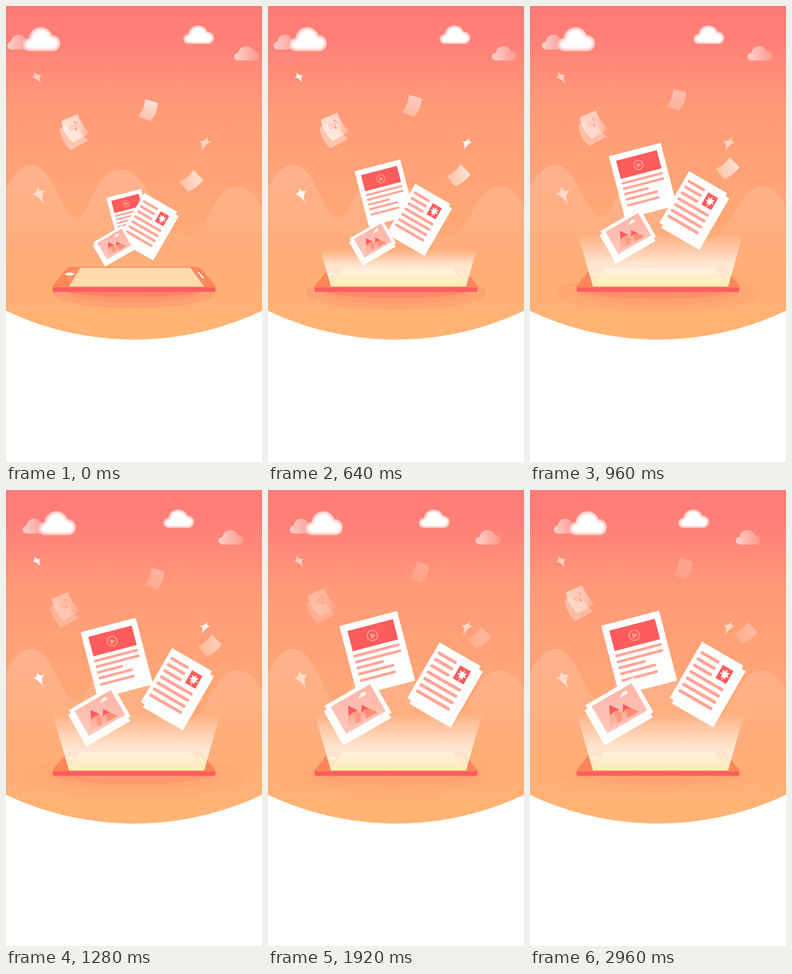
Animation of 561x998 px, one loop 3000 ms. Source, as an HTML page:

```html
<!DOCTYPE html>
<html lang="en">
<head>
<meta charset="utf-8">
<title>Documents rising</title>
<style>
html, body { margin: 0; width: 100%; height: 100%; overflow: hidden; background: #fff; }
svg { display: block; width: 100%; height: 100%; }
</style>
</head>
<body>
<svg viewBox="0 0 561 998" xmlns="http://www.w3.org/2000/svg">
  <defs>
    <linearGradient id="sky" x2="0" y2="1">
      <stop stop-color="#ff7a78"/><stop offset=".1" stop-color="#ff8078"/>
      <stop offset=".3" stop-color="#ff9a78"/><stop offset=".5" stop-color="#ffa377"/>
      <stop offset="1" stop-color="#ffb574"/>
    </linearGradient>
    <linearGradient id="hill" x2="0" y2="1">
      <stop stop-color="#fff" stop-opacity=".17"/><stop offset="1" stop-color="#fff" stop-opacity="0"/>
    </linearGradient>
    <linearGradient id="mist">
      <stop stop-color="#fff" stop-opacity=".62"/><stop offset="1" stop-color="#fff" stop-opacity=".15"/>
    </linearGradient>
    <linearGradient id="sheet" x1=".7" y1="0" x2=".4" y2="1">
      <stop stop-color="#fff" stop-opacity=".72"/><stop offset="1" stop-color="#fff" stop-opacity=".36"/>
    </linearGradient>
    <linearGradient id="sheetSide" x1="0" y1=".7" x2="1" y2=".4">
      <stop stop-color="#fff" stop-opacity=".35"/><stop offset="1" stop-color="#fff" stop-opacity=".75"/>
    </linearGradient>
    <linearGradient id="sheetNote" x1="0" y1=".5" x2="1" y2=".6">
      <stop stop-color="#fff" stop-opacity=".72"/><stop offset=".6" stop-color="#fff" stop-opacity=".6"/>
      <stop offset="1" stop-color="#fff" stop-opacity=".18"/>
    </linearGradient>
    <linearGradient id="photo" x1="1" y1="0" x2="0" y2="1">
      <stop stop-color="#ffb5a5"/><stop offset="1" stop-color="#ffc8bd"/>
    </linearGradient>
    <linearGradient id="slope" x2="0" y2="1">
      <stop stop-color="#ff9880"/><stop offset="1" stop-color="#ffb9aa"/>
    </linearGradient>
    <linearGradient id="glow" gradientUnits="userSpaceOnUse" x1="0" x2="0" y1="488" y2="614">
      <stop stop-color="#fff" stop-opacity="0"/>
      <stop id="glowMid" stop-color="#fff6ec" stop-opacity=".82"/>
      <stop offset="1" stop-color="#fdecb4"/>
    </linearGradient>
    <filter id="soft" x="-20%" y="-20%" width="140%" height="140%"><feGaussianBlur stdDeviation="3"/></filter>
    <path id="puff" d="M14 52A14 14 0 0 1 13 24A26 26 0 0 1 63.5 17.5A17.5 17.5 0 0 1 68 52Z"/>
    <clipPath id="puffClip"><use href="#puff"/></clipPath>
    <g id="cloud">
      <use href="#puff" fill="#fff"/>
      <g clip-path="url(#puffClip)">
        <use href="#puff" fill="none" stroke="#ffa29c" stroke-width="6" filter="url(#soft)"/>
      </g>
    </g>
    <clipPath id="ground"><path d="M0 0H561V667A656 656 0 0 1 0 667Z"/></clipPath>
  </defs>

  <path d="M0 0H561V667A656 656 0 0 1 0 667Z" fill="url(#sky)"/>
  <path fill="url(#hill)" d="M0 398C18 366 36 348 55 348C104 348 122 463 155 463C187 463 190 358 251 358C314 358 345 508 393 508C440 508 452 395 508 395C530 395 548 415 561 437V590H0Z"/>

  <g id="mistLeft"><use href="#puff" fill="url(#mist)" transform="translate(3 63) scale(.64 .62)"/></g>
  <g id="cloudLeft"><use href="#cloud" transform="translate(37.5 46.5)"/></g>
  <g id="cloudRight"><use href="#cloud" transform="translate(389 42.5) scale(.82 .78)"/></g>
  <g id="mistRight"><use href="#puff" fill="url(#mist)" transform="translate(500.5 88) scale(.66 .6)"/></g>

  <g id="stars"></g>

  <g id="notePaper">
    <path d="M118 268L152 254Q158 274 180 294L142 315Q120 296 118 268Z" fill="#fff" fill-opacity=".42"/>
    <path d="M121 252L157 237Q163 257 183 278L147 299Q124 278 121 252Z" fill="url(#sheetNote)"/>
    <g stroke="#ff9c84" stroke-width="1.5" fill="none" opacity=".8">
      <path d="M136 265l11-5M138 268.500l11-5M141 272l10-5"/>
      <path d="M148 254q6-2 8 5M149 254l5 15" stroke-width="2"/>
      <circle cx="153.500" cy="270" r="2.200" fill="#ff9c84"/>
    </g>
  </g>
  <path id="tallPaper" fill="url(#sheet)" d="M305 204L333 212Q331 237 316 252L290 242Q303 226 305 204Z"/>
  <path id="widePaper" fill="url(#sheetSide)" d="M411 359L432 381Q415 402 398 406L380 384Q398 378 411 359Z"/>

  <g id="ripples" fill="#ff5a5e" clip-path="url(#ground)"><ellipse/><ellipse/><ellipse/></g>

  <path d="M102 617V613L131 577Q136 571 143 571H416Q424 571 428 575L459 612V617Z" fill="#ff8659"/>
  <path d="M163 573L133 584L138 614ZM404 573L440 608L434 614Z" fill="#ff9a68" opacity=".45"/>
  <path d="M102 616H459V622Q459 625.500 455 625.500H106Q102 625.500 102 622Z" fill="#ff5c5f"/>
  <path d="M163 573H404L434 614H138Z" fill="#ffdbad"/>
  <ellipse cx="139.500" cy="586.800" rx="10.300" ry="3.200" fill="#fff"/>
  <path d="M426.500 588.500L431.500 594.500M422.500 584.300l1 .2" stroke="#fff" stroke-width="3.600" stroke-linecap="round"/>

  <path id="beam" fill="url(#glow)"/>

  <g id="videoDoc">
    <rect width="131" height="158" fill="#fff" stroke="#f08060" stroke-opacity=".14" stroke-width=".7"/>
    <rect x="14.500" y="15" width="103" height="46" fill="#ff5c5c"/>
    <circle cx="65" cy="38.500" r="11.300" fill="none" stroke="#ff9d8a" stroke-width="2.500"/>
    <path d="M62 34.500L70 39L62 43.500Z" fill="#ff9d8a" stroke="#ff9d8a" stroke-width="3" stroke-linejoin="round"/>
    <path d="M16 72.500H115M16 86H115M16 99.500H72M16 113H92M16 128H92" stroke="#ffa696" stroke-width="6" stroke-linecap="round"/>
  </g>

  <g id="textDoc">
    <rect x="10" y="8" width="105" height="142" fill="#fff"/>
    <rect width="105" height="142" fill="#fff" stroke="#f08060" stroke-opacity=".16" stroke-width=".8"/>
    <path d="M12 21H52M12 37H52M12 53H52M12 69H90M12 85H90M12 101H90M12 117H90" stroke="#ffa696" stroke-width="7.200" stroke-linecap="round"/>
    <rect x="65" y="21" width="27" height="33" fill="#ff5c5c"/>
    <path id="leaf" fill="#fff" stroke="#fff" stroke-width="1.500" stroke-linejoin="round"/>
    <path d="M79 38V53" stroke="#fff" stroke-width="1.600"/>
  </g>

  <g id="photoDoc">
    <rect x="-7" y="9" width="122" height="88" fill="#fff"/>
    <rect width="122" height="88" fill="#fff" stroke="#f08060" stroke-opacity=".16" stroke-width=".8"/>
    <rect x="11" y="9" width="101" height="69" fill="url(#photo)"/>
    <path d="M46 26L22 70H70Z" fill="url(#slope)"/>
    <path d="M46 26L48 45L42 70H70Z" fill="#ff9a80"/>
    <path d="M73 39L50 71H95Z" fill="url(#slope)"/>
    <path d="M73 39V52L66 71H95Z" fill="#ff8f74"/>
    <path d="M46 26L60 46L48 44L36 46ZM73 39L83 55L73 52L64 55Z" fill="#ff5c5f"/>
    <path d="M75 24q1-5 6-4q3-6 8-3q6-1 6 4q-2 4-8 3z" fill="#fff" opacity=".85"/>
  </g>
</svg>
<script>
const LOOP = 3000;
const $ = id => document.getElementById(id);
const clamp = v => Math.min(1, Math.max(0, v));
const lerp = (a, b, k) => a + (b - a) * k;
const set = (el, attrs) => { for (const k in attrs) el.setAttribute(k, attrs[k]); };

// Cubic bezier (.3, 0, .2, 1), solved for x by bisection.
function ease(x) {
  if (x <= 0) return 0;
  if (x >= 1) return 1;
  const curve = (a, b, s) => 3 * a * s * (1 - s) ** 2 + 3 * b * s * s * (1 - s) + s ** 3;
  let lo = 0, hi = 1;
  for (let i = 0; i < 24; i++) {
    const mid = (lo + hi) / 2;
    if (curve(.3, .2, mid) < x) lo = mid; else hi = mid;
  }
  return curve(0, 1, lo);
}
const progress = (t, delay, duration) => ease((t - delay) / duration);

function track(points, t) {
  const i = points.findIndex(p => p[0] > t);
  if (i < 0) return points[points.length - 1][1];
  const [[t0, a], [t1, b]] = [points[i - 1], points[i]];
  return lerp(a, b, (t - t0) / (t1 - t0));
}

const drift = { delay: 105, time: 2840 };
const drifters = [
  { id: 'mistLeft', dx: 49.5, dy: 0, ...drift },
  { id: 'cloudLeft', dx: 49.5, dy: 0, ...drift },
  { id: 'cloudRight', dx: -63.5, dy: 0, ...drift },
  { id: 'mistRight', dx: -49.5, dy: 0, ...drift },
  { id: 'notePaper', dx: -45.6, dy: -30.4, delay: 0, time: 4400,
    fade: [[0, .95], [640, .95], [960, .8], [1280, .55], [1700, .38], [1920, .42], [2960, .74]] },
  { id: 'tallPaper', dx: 23.5, dy: -56, delay: 30, time: 3450,
    fade: [[0, 1], [640, .75], [960, .57], [1280, .42], [1600, .33], [1920, .29], [2960, .28]] },
  { id: 'widePaper', dx: 67.3, dy: -70.4, delay: 30, time: 3450,
    fade: [[0, .9], [640, .95], [960, .95], [1280, .7], [1600, .46], [1920, .36], [2960, .38]] }
];

const docs = [
  { id: 'videoDoc', from: [220, 420, .6], to: [156, 297, 1], angle: -14.6, delay: 0, time: 2130 },
  { id: 'textDoc', from: [303, 409, .79], to: [377, 332, 1], angle: 30, delay: 190, time: 2080 },
  { id: 'photoDoc', from: [191.4, 517, .61], to: [121, 471, 1], angle: -30, delay: 240, time: 2200 }
];

const rings = [
  { cy: 627, rx: [180, 270], ry: [35, 53], alpha: k => .17 * (1 - k) },
  { cy: 627, rx: [143, 216], ry: [23, 35.5], alpha: k => .14 - .1 * k },
  { cy: 621, rx: [150, 186], ry: [16, 26], alpha: k => .32 - .23 * k }
];

const stars = [
  { at: [67.5, 155], tips: [[-6, -10], [9, -4], [8.5, 13], [-9, 1.5]] },
  { at: [436.5, 300], tips: [[5, -11.5], [11, -2], [-8, 16], [-11, -4]] },
  { at: [71.5, 412], tips: [[-3, -14], [13, -8], [10, 19], [-13, 0]] }
].map(star => {
  const el = document.createElementNS('http://www.w3.org/2000/svg', 'path');
  const sides = star.tips.map((tip, i) => {
    const next = star.tips[(i + 1) % 4];
    return `Q${tip.map((v, axis) => (v + next[axis]) * .12)} ${next}`;
  });
  set(el, { d: `M${star.tips[0]}${sides.join('')}Z`, fill: '#fff' });
  $('stars').append(el);
  return { el, at: star.at };
});

set($('leaf'), { d: 'M' + Array.from({ length: 14 }, (_, i) => {
  const r = i % 2 ? 4.5 : 10, a = i * Math.PI / 7 - Math.PI / 2;
  return [79 + r * Math.cos(a), 37 + r * Math.sin(a)].map(v => v.toFixed(2));
}).join('L') + 'Z' });

function draw(t) {
  for (const m of drifters) {
    const k = progress(t, m.delay, m.time);
    set($(m.id), { transform: `translate(${m.dx * k} ${m.dy * k})` });
    if (m.fade) set($(m.id), { opacity: track(m.fade, t) });
  }

  for (const doc of docs) {
    const k = progress(t, doc.delay, doc.time);
    const [x, y, s] = doc.from.map((v, i) => lerp(v, doc.to[i], k));
    set($(doc.id), { transform: `translate(${x} ${y}) rotate(${doc.angle}) scale(${s})` });
  }

  const spread = progress(t, drift.delay, drift.time);
  rings.forEach((ring, i) => set($('ripples').children[i], {
    cx: 280.5, cy: ring.cy,
    rx: lerp(...ring.rx, spread), ry: lerp(...ring.ry, spread),
    opacity: ring.alpha(spread)
  }));

  const height = 126 * progress(t, 160, 1270), top = 614 - height, flare = height * .286;
  set($('beam'), { d: `M138 614L${138 - flare} ${top}H${434 + flare}L434 614Z` });
  set($('glow'), { y1: Math.min(top, 613) });
  set($('glowMid'), { offset: height ? clamp((571 - top) / height) : 0 });

  const shine = clamp(.5 - .9 * Math.cos(2 * Math.PI * (t / 1000 + .04)));
  for (const star of stars) set(star.el, {
    transform: `translate(${star.at}) scale(${lerp(1.2, 1, shine)})`,
    opacity: lerp(.55, .95, shine)
  });
}

const start = performance.now();
function tick() {
  draw((performance.now() - start) % LOOP);
  requestAnimationFrame(tick);
}
tick();
</script>
</body>
</html>
```
